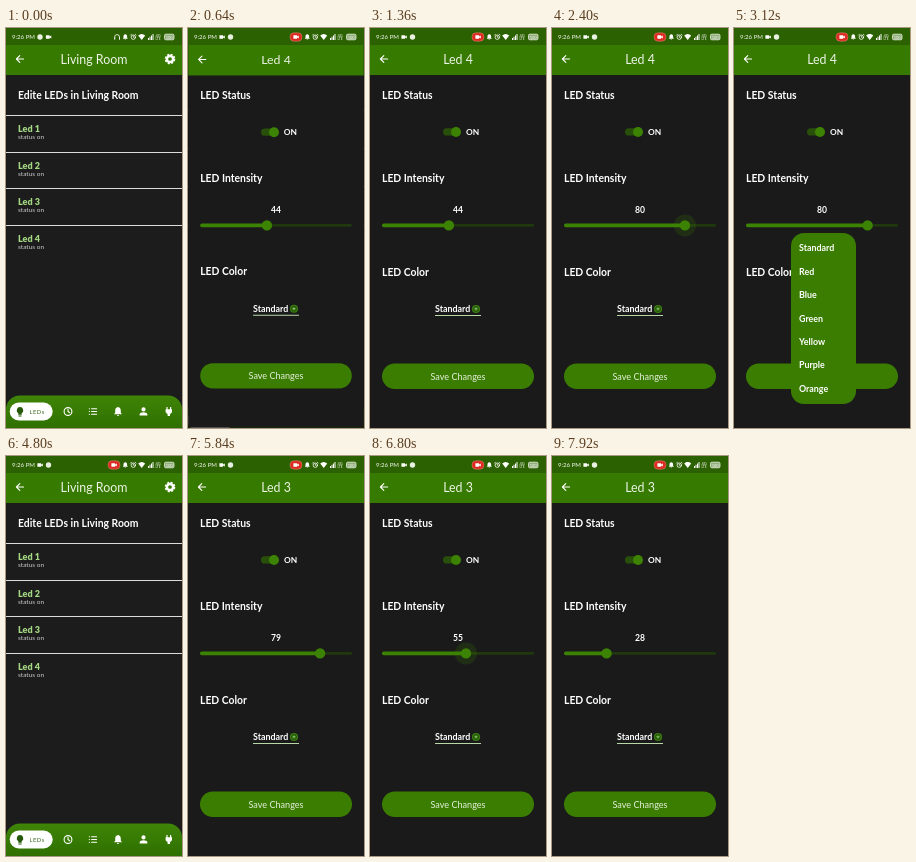
An HTML page that plays this animation: 176x400 px, repeating every 8 s.

```html
<!DOCTYPE html>
<html lang="en">
<head>
<meta charset="utf-8">
<title>LED control</title>
<style>
html, body { margin: 0; width: 100%; height: 100%; overflow: hidden; background: #1b1b1b; }
svg { display: block; width: 100vw; height: 100vh; }
text { font-family: Lato, "Open Sans", sans-serif; fill: #fff; }
.title { font-size: 12.4px; text-anchor: middle; fill: #eef5e8; }
.head { font-size: 10.4px; font-weight: 700; }
.led { font-size: 9px; font-weight: 900; fill: #a5d883; }
.sub { font-size: 6.5px; fill: #ccc; }
.item { font-size: 8.9px; font-weight: 700; }
.mid { text-anchor: middle; }
.line { fill: none; stroke: #fff; stroke-width: 1.1; stroke-linecap: round; stroke-linejoin: round; }
.thin { stroke-width: .8; }
</style>
</head>
<body>
<svg viewBox="0 0 176 400" preserveAspectRatio="none">
  <defs>
    <linearGradient id="bar" x1="0" y1="0" x2="0" y2="1">
      <stop offset="0" stop-color="#3f8507"/><stop offset="1" stop-color="#2f6f00"/>
    </linearGradient>
    <clipPath id="menuClip"><rect id="menuArea" x="57" y="205" width="65" height="171" rx="13"/></clipPath>
    <path id="bell" d="M0-4.4c2 .4 2.8 1.8 2.8 3.6v2.1l1.2 1.5h-8l1.2-1.5v-2.1c0-1.8.8-3.2 2.8-3.6zM-1 3.4h2a1 1 0 0 1-2 0z" fill="#fff"/>
    <path id="back" class="line" d="M17.6 31h-7M13.8 27.6 10.4 31l3.4 3.4"/>
    <path id="cam" d="M-2.6-1.8h3.7v1.2l1.7-1v3.2l-1.7-1v1.2h-3.7z" fill="#fff"/>
  </defs>

  <g id="list">
    <rect width="176" height="400" fill="#1c1c1c"/>
    <rect width="176" height="47" fill="#377a00"/>
    <use href="#back"/>
    <text class="title" x="88" y="35.5">Living Room</text>
    <circle cx="164" cy="31" r="3.1" fill="none" stroke="#fff" stroke-width="2.5"/>
    <circle cx="164" cy="31" r="4.5" fill="none" stroke="#fff" stroke-width="1.6" stroke-dasharray="2.1 1.434"/>
    <text class="head" x="12" y="71">Edite LEDs in Living Room</text>
    <rect id="tap" width="176" height="36.5" fill="#fff" opacity="0"/>
    <g id="rows"></g>
    <path d="M0 400V381.5a14 14 0 0 1 14-14h148a14 14 0 0 1 14 14v18.5z" fill="url(#bar)"/>
    <rect x="3.7" y="374.5" width="43" height="18" rx="9" fill="#fff"/>
    <path d="M14 379a3.3 3.3 0 0 1 1.7 6.1v1.6h-3.4v-1.6A3.3 3.3 0 0 1 14 379zM12.4 387.4h3.2v1h-3.2z" fill="#25580a"/>
    <text x="23.5" y="386" font-size="5.8" letter-spacing=".5" style="fill:#3b6a1c">LEDs</text>
    <g transform="translate(62 383.5)" class="line"><circle r="3.9"/><path d="M0-2.3V0l1.7 1.2"/></g>
    <path class="line" d="M83.3 380.7h.2M85.6 380.7h5M83.3 383.5h.2M85.6 383.5h5M83.3 386.3h.2M85.6 386.3h5"/>
    <use href="#bell" x="112" y="383.5"/>
    <path d="M137.5 379.3a2.1 2.1 0 0 1 0 4.2 2.1 2.1 0 0 1 0-4.2zM133.6 387.6v-1c0-3 7.8-3 7.8 0v1z" fill="#fff"/>
    <path d="M160.4 379h1.2v2.3h2.4V379h1.2v2.3h.8v3l-2 2v1.7h-2.4v-1.7l-2-2v-3h.8z" fill="#fff"/>
  </g>

  <rect id="scrim" width="176" height="400" opacity="0"/>

  <g id="detail">
    <rect width="176" height="400" fill="#1a1a1a"/>
    <rect width="176" height="47" fill="#377a00"/>
    <use href="#back"/>
    <text id="name" class="title" x="88" y="35.5">Led 4</text>
    <text class="head" x="12" y="70.5">LED Status</text>
    <rect x="73" y="100.2" width="17" height="7.4" rx="3.7" fill="#28500a"/>
    <circle cx="86" cy="104" r="5" fill="#3d8303"/>
    <text class="mid" x="102.5" y="107" font-size="8.4" font-weight="700">ON</text>
    <text class="head" x="12" y="154">LED Intensity</text>
    <text id="value" class="mid" x="88" y="185" font-size="8.6" font-weight="700">44</text>
    <rect x="12" y="196.1" width="152" height="2.6" rx="1.3" fill="#20380e"/>
    <rect id="fill" x="12" y="195.6" height="3.6" rx="1.8" fill="#3d8303"/>
    <circle id="halo" cy="197.4" r="11" fill="#3d8303"/>
    <circle id="thumb" cy="197.4" r="5.2" fill="#3d8303"/>
    <text class="head" x="12" y="247.5">LED Color</text>
    <text id="color" class="item" x="65" y="284">Standard</text>
    <circle cx="106" cy="281" r="4.1" fill="#3b7d12"/>
    <circle cx="106" cy="281" r="2.5" fill="none" stroke="#1f4a08" stroke-width=".8"/>
    <path d="M104.5 280.2h3l-1.5 1.9z" fill="#9cc586"/>
    <rect x="65" y="287" width="46" height="1" fill="#b9d6a6"/>
    <rect x="12" y="335.5" width="152" height="25.5" rx="12.75" fill="#3a7d00"/>
    <text class="mid" x="88" y="351.5" font-size="9.1" style="fill:#e6f0de">Save Changes</text>
  </g>

  <g id="menu" clip-path="url(#menuClip)" opacity="0">
    <rect x="57" y="205" width="65" height="171" fill="#3a7d00"/>
    <g id="options"></g>
  </g>

  <g id="status">
    <rect width="176" height="17" fill="#2b6100"/>
    <text x="6" y="11.2" font-size="6.1">9:26 PM</text>
    <use id="camera" href="#cam" y="9"/>
    <circle id="chat" cy="9" r="2.7" fill="#e8f0e2"/>
    <path id="headset" class="line thin" d="M108.7 10.5V9a2.4 2.4 0 0 1 4.8 0v1.5M108.7 10v1.4M113.5 10v1.4"/>
    <g id="rec"><rect x="102" y="4.8" width="12" height="8.4" rx="4" fill="#dc2a20" stroke="#e9a196" stroke-width=".4"/><use href="#cam" x="108" y="9"/></g>
    <use href="#bell" transform="translate(119.3 9) scale(.65)"/>
    <g transform="translate(127.3 9.2)" class="line thin"><circle r="2.2"/><path d="M0-1.2V0l1 .7M-2.7-2.1l.9-.9M2.7-2.1l-.9-.9"/></g>
    <path d="M132.2 7.4q3.5-3 7 0L135.7 12z" fill="#fff"/>
    <path d="M142 12V10h1v2zM143.5 12V8.8h1V12zM145 12V7.4h1V12zM146.5 12V6h1v6z" fill="#fff"/>
    <text x="149.5" y="9" font-size="4">4G</text>
    <text x="149.5" y="12.3" font-size="3.2">LTE</text>
    <rect x="158.5" y="6.2" width="9.5" height="5.6" rx="1.3" fill="#8fae78" stroke="#fff" stroke-width=".7"/>
    <text class="mid" x="163.2" y="10.5" font-size="4">100</text>
  </g>
</svg>
<script>
const LOOP = 8000;
const $ = id => document.getElementById(id);
const set = (id, attrs) => { for (const k in attrs) $(id).setAttribute(k, attrs[k]); };
const write = (id, text) => { if ($(id).textContent !== String(text)) $(id).textContent = text; };
const span = (t, a, b) => Math.min(1, Math.max(0, (t - a) / (b - a)));
const easeOut = p => 1 - (1 - p) ** 3;
const easeInOut = p => p * p * (3 - 2 * p);
const mix = (a, b, p) => a + (b - a) * p;
const zoom = s => `translate(88 200) scale(${s}) translate(-88 -200)`;
const rowTop = i => Math.round(87.3 + i * 36.4);

$('rows').innerHTML = [0, 1, 2, 3].map(i => {
  const y = rowTop(i);
  return `<rect y="${y}" width="176" height="1" fill="#dcdcdc"/>
    <text class="led" x="12" y="${y + 16.6}">Led ${i + 1}</text>
    <text class="sub" x="12" y="${y + 24.4}">status on</text>`;
}).join('');

$('options').innerHTML = ['Standard', 'Red', 'Blue', 'Green', 'Yellow', 'Purple', 'Orange']
  .map((c, i) => `<text class="item" x="65" y="${223.3 + i * 23.4}">${c}</text>`).join('');

const push1 = 420, pop = 4420, push2 = 5270, travel = 300;
const drags = [
  { from: 44, to: 80, start: 1700, end: 2450 },
  { from: 79, to: 28, start: 6300, end: 7350 }
];

function pages(t) {
  const second = t >= push2;
  const leaving = t >= pop && !second;
  let detail, under, alpha, dim;
  if (leaving) {
    const p = span(t, pop, pop + travel), e = easeInOut(p);
    detail = mix(1, .88, e);
    under = mix(1.05, 1, e);
    alpha = 1 - span(p, .22, .6);
    dim = 0;
  } else {
    const start = second ? push2 : push1;
    const p = span(t, start, start + travel), e = easeOut(p);
    detail = mix(.85, 1, e);
    under = mix(1, 1.05, e);
    alpha = span(p, .1, .45);
    dim = .5 * span(p, 0, .5);
  }
  set('detail', { transform: zoom(detail), opacity: alpha });
  set('list', { transform: zoom(under) });
  set('scrim', { opacity: dim });
  write('name', second ? 'Led 3' : 'Led 4');

  const start = t < pop ? push1 : push2;
  const press = span(t, start - 130, start - 40) * (1 - span(t, start + 100, start + 250));
  set('tap', { y: rowTop(t < pop ? 3 : 2), opacity: .12 * press });
}

function slider(t) {
  const d = drags[t < push2 ? 0 : 1];
  const v = mix(d.from, d.to, easeInOut(span(t, d.start, d.end)));
  const x = 12 + 1.52 * v;
  write('value', Math.round(v));
  set('fill', { width: x - 12 });
  set('thumb', { cx: x });
  set('halo', { cx: x, opacity: .2 * span(t, d.start - 80, d.start) * (1 - span(t, d.end, d.end + 120)) });
}

function menu(t) {
  const open = span(t, 2760, 3000);
  set('menu', { opacity: span(open, 0, .3) * (1 - span(t, 3560, 3700)) });
  set('menuArea', { height: mix(27, 171, easeOut(span(open, .2, 1))) });
  write('color', t >= 3560 && t < push2 ? 'Orange' : 'Standard');
}

function status(t) {
  const recording = t >= 160;
  set('rec', { opacity: recording ? 1 : 0 });
  set('headset', { opacity: recording ? 0 : 1 });
  set('camera', { x: recording ? 34 : 42.5 });
  set('chat', { cx: recording ? 42.5 : 34 });
}

function draw(t) {
  pages(t);
  slider(t);
  menu(t);
  status(t);
}

const begin = performance.now();
function frame() {
  draw((performance.now() - begin) % LOOP);
  requestAnimationFrame(frame);
}
frame();
</script>
</body>
</html>
```
